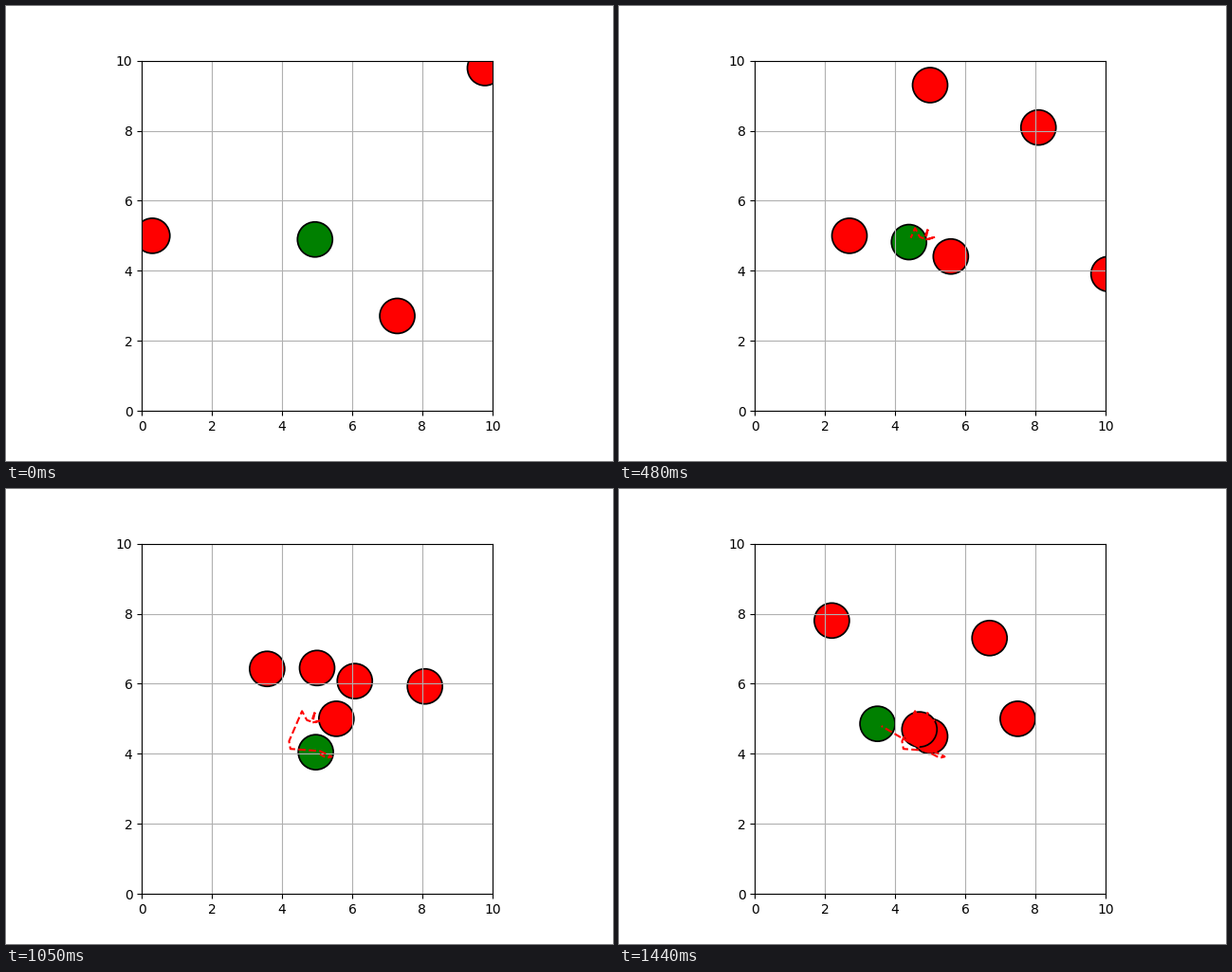
Write a matplotlib script that moves like this. It is 640 px wide and 480 px high and loops after 1.47 s.

```python
import numpy as np
import matplotlib.pyplot as plt
from matplotlib.animation import FuncAnimation

FRAMES = 49
INTERVAL = 30
RADIUS = 0.5
SPEED = 0.15
LEAD = 2  # steps the obstacles have made before the first frame
SAMPLES = 8  # trail points per step

# Obstacles: start x, start y, heading in degrees
OBSTACLES = [(0, 5, 0), (5, 12, -90), (10, 10, -135),
             (7.5, 2.5, 135), (12, 2, 135)]

# Turning points of the robot, which travels between them at an even pace
TURNS = np.array([
    (4.94, 4.895), (5.15, 4.97), (4.87, 4.89), (4.95, 5.23), (4.84, 4.92),
    (4.71, 4.96), (4.57, 5.22), (4.2, 4.36), (4.24, 4.14), (5.08, 4.08),
    (5.42, 3.92), (5.28, 3.88), (4.23, 4.43), (3.5, 4.857),
])
LENGTHS = np.hypot(*np.diff(TURNS, axis=0).T)
TIMES = np.append(0, np.cumsum(LENGTHS)) * (FRAMES - 1) / LENGTHS.sum()


def robot_at(step):
    return [np.interp(step, TIMES, axis) for axis in TURNS.T]


def obstacle_at(step, x, y, heading):
    angle = np.radians(heading)
    path = SPEED * (step + LEAD)
    return x + path * np.cos(angle), y + path * np.sin(angle)


def add_disc(color):
    return ax.add_patch(plt.Circle((0, 0), RADIUS, facecolor=color,
                                   edgecolor="black", linewidth=1.25))


fig, ax = plt.subplots(figsize=(6.4, 4.8), dpi=100)
ax.set(aspect="equal", xlim=(0, 10), ylim=(0, 10))
ax.grid(True)

robot = add_disc("green")
discs = [add_disc("red") for _ in OBSTACLES]
trail, = ax.plot([], [], "--r")


def update(frame):
    robot.center = robot_at(frame)
    # The trail ends one step behind the robot
    last = max(frame - 1, 0)
    trail.set_data(*robot_at(np.linspace(0, last, last * SAMPLES + 1)))
    for disc, obstacle in zip(discs, OBSTACLES):
        disc.center = obstacle_at(frame, *obstacle)
    return [robot, trail, *discs]


anim = FuncAnimation(fig, update, frames=FRAMES, interval=INTERVAL,
                     repeat=True, repeat_delay=0)
plt.show()
```
